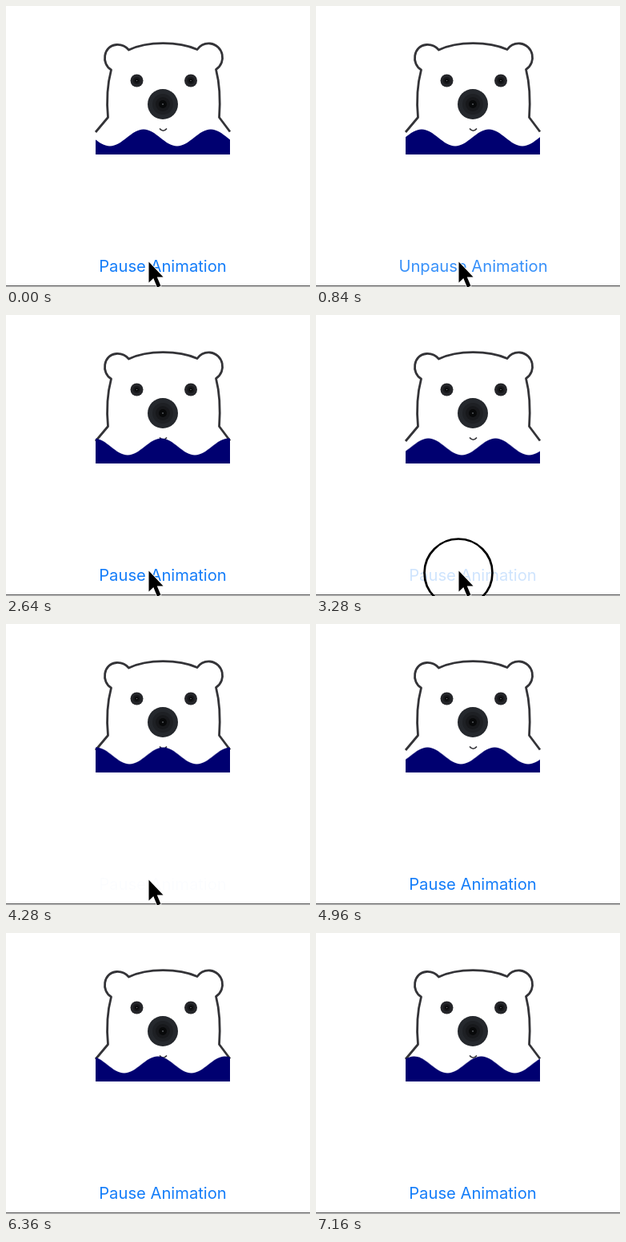
These frames come from a looping animation (380 px wide and 352 px high, 7200 ms). An HTML page:

```html
<!DOCTYPE html>
<html lang="en">
<head>
<meta charset="utf-8">
<title>Bear in the waves</title>
<style>
  html, body { margin: 0; width: 100%; height: 100%; overflow: hidden; background: #fff; }
  svg { display: block; width: 380px; height: 352px; }
  text { font: 20.2px Inter, "Liberation Sans", sans-serif; fill: #147df9; text-anchor: middle; }
  .line { fill: none; stroke: #343438; stroke-width: 2.8; stroke-linejoin: round; }
</style>
</head>
<body>
<svg viewBox="0 0 380 352">
  <defs>
    <clipPath id="sea"><rect x="112" y="150" width="168" height="36"/></clipPath>
    <g id="eye">
      <circle r="8" fill="#25262a"/>
      <circle r="4.5" fill="#17181b"/>
      <circle r="2.2" fill="#050506"/>
      <circle r=".8" fill="#66686c"/>
    </g>
  </defs>

  <g clip-path="url(#bearBox)">
    <path class="line" d="M112 158 L127.500 139.500 C125.500 119 127 97 131.500 80
      C119 73 121 50 138 48.500 C145 48 150 51 153.500 55
      C177 44 215 44 239 54.500 C243 49 249 46.500 255 47
      C272 49 276 71 262.500 79.500 C267 97 268 119 266.500 139.500 L280 157.500"/>
    <use href="#eye" x="163.500" y="93.500"/>
    <use href="#eye" x="231" y="93.500"/>
    <g transform="translate(196 123)">
      <circle r="19" fill="#25282d"/>
      <circle r="13" fill="#1e2024"/>
      <circle r="9" fill="#17181b"/>
      <circle r="5" fill="#08090a"/>
      <circle r="1" fill="#55585c"/>
    </g>
    <path class="line" style="stroke-width:1.6" d="M192 153.500 Q196.500 159 201 153.500"/>
  </g>

  <g clip-path="url(#sea)">
    <path id="wave" fill="#000070" d="M88 154.500
      c15.300 0 26.700 21 42 21 s26.700-21 42-21 s26.700 21 42 21 s26.700-21 42-21
      s26.700 21 42 21 s26.700-21 42-21 s26.700 21 42 21 s26.700-21 42-21
      s26.700 21 42 21 s26.700-21 42-21 s26.700 21 42 21 s26.700-21 42-21
      s26.700 21 42 21 s26.700-21 42-21 s26.700 21 42 21 s26.700-21 42-21 V186 H88Z"/>
  </g>

  <text id="pause" x="196" y="333">Pause Animation</text>
  <text id="unpause" x="196.500" y="333" opacity="0">Unpause Animation</text>
  <rect y="350" width="380" height="1.300" fill="#555"/>

  <circle id="ring" cx="178" cy="323" r="42.500" fill="none" stroke="#000" stroke-width="2.700" opacity="0"/>
  <path id="cursor" d="M178.500 320.500 V346.500 L184.300 341 L189 352.500 L193.500 350.700 L188.800 339.500 H196.500Z"
    stroke="#fff" stroke-width="1.600" paint-order="stroke"/>
</svg>
<script>
  const LOOP = 7200;
  const PERIOD = 84; // wave length in px, travelled once per second
  const [STOP1, GO1, STOP2, GO2] = [476, 1381, 3573, 4240];
  const FADE = 500;

  // steps: [time in ms, value, easing to the next step]
  function play(id, prop, steps) {
    const frames = steps.map(([ms, value, easing = 'linear']) =>
      ({ offset: ms / LOOP, [prop]: value, easing }));
    document.getElementById(id).animate(frames, { duration: LOOP, iterations: Infinity });
  }

  const shift = ms => `translate(${-PERIOD * ms / 1000}px, 0)`;
  const first = STOP1, second = first + STOP2 - GO1, last = second + LOOP - GO2;
  play('wave', 'transform', [
    [0, shift(0)], [STOP1, shift(first)], [GO1, shift(first)],
    [STOP2, shift(second)], [GO2, shift(second)], [LOOP, shift(last)]
  ]);

  const appear = ms => [[ms, 0, 'ease-in-out'], [ms + FADE, 1]];
  const press = (down, up) => [[down, 1], [down + 45, .2], [up, .2], [up, 0]];
  play('pause', 'opacity', [
    [0, 1], ...press(280, STOP1), ...appear(GO1),
    ...press(3230, STOP2), ...appear(GO2), [LOOP, 1]
  ]);
  play('unpause', 'opacity', [
    [0, 0], ...appear(STOP1), ...press(1198, GO1),
    ...appear(STOP2), ...press(4085, GO2), [LOOP, 0]
  ]);

  const flash = (on, off) => [[on, 0], [on, 1], [off, 1], [off, 0]];
  play('ring', 'opacity', [
    [0, 0], ...flash(280, STOP1), ...flash(1198, GO1),
    ...flash(3230, STOP2), ...flash(4085, GO2), [LOOP, 0]
  ]);

  const at = (x, y) => `translate(${x}px, ${y}px)`;
  const away = at(0, 40), corner = at(145, -236);
  play('cursor', 'transform', [
    [0, at(0, 0)], [4700, at(0, 0), 'ease-in'], [4800, away],
    [6280, away], [6280, corner], [6350, corner], [6350, away], [LOOP, away]
  ]);
</script>
</body>
</html>
```
